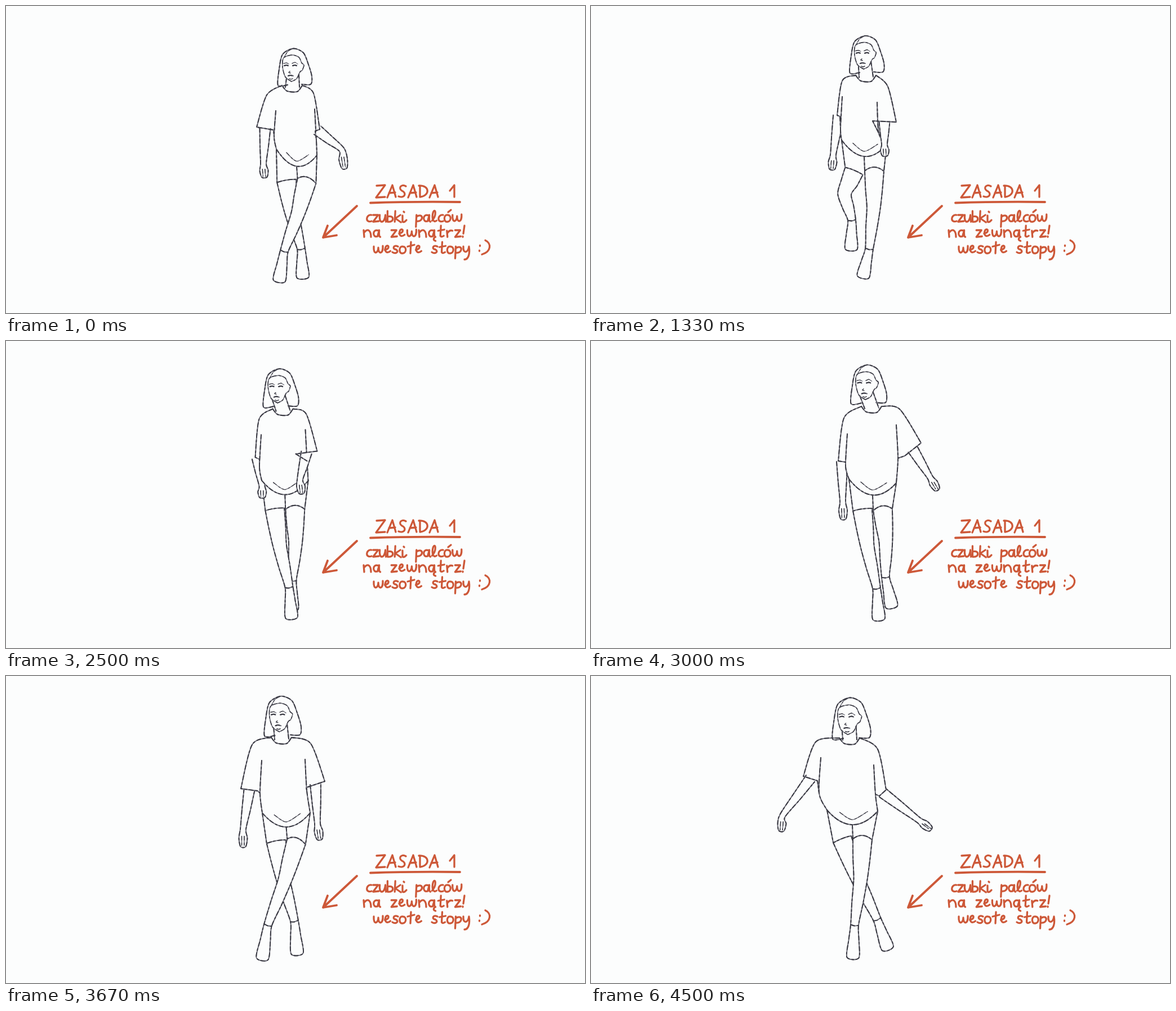
Recreate the animation shown at these times as an HTML page with a canvas. Size 1028 by 545 pixels, loop 4670 ms.

```html
<!DOCTYPE html>
<html lang="pl">
<head>
<meta charset="utf-8">
<title>Zasada 1</title>
<style>
html, body { margin: 0; width: 100%; height: 100%; overflow: hidden; background: #fcfdfd; }
canvas { display: block; width: 1028px; height: 545px; }
</style>
</head>
<body>
<canvas id="stage" width="1028" height="545" role="img"
  aria-label="ZASADA 1: czubki palców na zewnątrz! wesołe stopy :)"></canvas>
<script>
const LOOP = 4670, STEPS = 28, PAPER = '#fcfdfd', RED = '#cd5838';
const g = document.getElementById('stage').getContext('2d');
g.lineCap = g.lineJoin = 'round';

const parse = s => s.split(' ').map(p => p.split(',').map(Number));
const mix = (a, b, t = 0.5) => [a[0] + (b[0] - a[0]) * t, a[1] + (b[1] - a[1]) * t];
const move = (p, x, y) => [p[0] + x, p[1] + y];

// ---- Poses: the joints of the body at a few steps; L and R as seen on screen
const joints = ('chin neck shoulderL shoulderR outL inL outR inR waistL waistR hemL hemR ' +
  'wristL tipL wristR tipR ankleL toeL ankleR toeR').split(' ');

const poses = [
  [0, '507,134 508,147 463,158 546,155', '445,215 475,220 557,219 549,222', '476,232 551,238 480,254 552,265',
    '457,280 459,304 596,255 601,288', '524,431 527,482 494,435 485,488'],
  [4, '491,127 499,138 446,140 541,158', '424,206 445,212 550,215 538,220', '455,229 536,230 458,249 537,245',
    '408,266 407,292 611,231 627,247', '513,423 526,473 494,434 484,486'],
  [8, '484,112 488,129 446,133 527,143', '437,194 442,196 542,206 500,204', '443,218 511,226 445,238 525,246',
    '430,264 428,290 521,246 522,266', '463,380 462,432 494,431 483,481'],
  [12, '477,116 485,131 450,140 518,138', '446,200 448,205 519,210 472,197', '448,225 524,218 450,250 531,244',
    '462,230 462,240 442,250 435,277', '498,435 503,489 494,431 482,482'],
  [18, '487,104 498,122 449,137 548,121', '439,213 452,215 586,181 557,204', '452,222 545,208 458,245 542,252',
    '447,285 448,316 602,242 615,264', '507,439 511,494 523,419 534,472'],
  [22, '485,99 489,115 437,122 541,120', '417,200 447,204 566,187 533,198', '451,208 534,203 455,243 540,243',
    '421,272 421,303 553,262 557,290', '512,435 517,493 465,442 455,502'],
  [27, '456,104 459,116 399,117 509,130', '377,178 402,186 524,202 512,213', '405,208 505,210 419,238 509,240',
    '340,248 338,275 582,256 603,272', '508,432 527,484 468,442 465,500']
].map(([step, ...groups]) => ({ step, pts: parse(groups.join(' ')) }));

function poseAt(step) {
  const i = poses.findLastIndex(p => p.step <= step);
  const a = poses[i], b = poses[i + 1] || a;
  const t = (step - a.step) / (b.step - a.step || 1);
  const p = { scale: 1 + 0.12 * (step / 27) ** 2 };
  joints.forEach((name, n) => p[name] = mix(a.pts[n], b.pts[n], t));
  p.hemM = move(mix(p.hemL, p.hemR), 0, 25);
  return p;
}

// ---- Pencil
function curve(pts) {
  const path = new Path2D(), at = i => pts[Math.max(0, Math.min(pts.length - 1, i))];
  path.moveTo(...pts[0]);
  for (let i = 0; i < pts.length - 1; i++) {
    const [o, a, b, c] = [at(i - 1), at(i), at(i + 1), at(i + 2)];
    path.bezierCurveTo(a[0] + (b[0] - o[0]) / 7, a[1] + (b[1] - o[1]) / 7,
      b[0] - (c[0] - a[0]) / 7, b[1] - (c[1] - a[1]) / 7, ...b);
  }
  return path;
}

// Soft base with darker touches
function ink(path, width = 1.9) {
  g.lineWidth = width;
  g.strokeStyle = '#686873';
  g.stroke(path);
  g.setLineDash([7, 5, 3, 4]);
  g.strokeStyle = '#383841';
  g.stroke(path);
  g.setLineDash([]);
}

function solid(path) {
  g.fillStyle = PAPER;
  g.fill(path);
  ink(path);
}

const line = (pts, width) => ink(curve(pts), width);

// Both edges of a limb with the given half widths along its spine
function edges(spine, widths) {
  const side = s => spine.map((p, i) => {
    const a = spine[Math.max(0, i - 1)], b = spine[Math.min(spine.length - 1, i + 1)];
    const dx = b[0] - a[0], dy = b[1] - a[1], k = s * widths[i] / Math.hypot(dx, dy);
    return move(p, dy * k, -dx * k);
  });
  return [side(-1), side(1)];
}

// ---- Body parts
function leg(p, s) {
  const out = s === 'L' ? -1 : 1, ankle = p['ankle' + s], toe = p['toe' + s];
  const hip = move(p.hemM, 18 * out, 26);
  const bend = 3 + Math.max(0, 472 - toe[1]) * 0.3;
  const knee = move(mix(hip, ankle, 0.47), bend * out, 0);
  const spine = [hip, mix(hip, knee), knee, mix(knee, ankle), ankle, mix(ankle, toe, 0.45), toe];
  const [l, r] = edges(spine, [17, 15, 12, 10, 7, 9, 10.5]);
  const path = curve([...l, ...[...r].reverse()]), top = mix(l[0], r[0]);
  path.quadraticCurveTo(top[0], top[1] - (s === 'R' ? 14 : 3), ...l[0]);
  solid(path);
  line([l[4], move(ankle, 0, 1.5), r[4]]);
  // shorts
  line([p['hem' + s], out < 0 ? l[0] : r[0]]);
  if (s === 'R') line([p.hemM, l[0]]);
}

function arm(p, s) {
  const cuff = mix(p['out' + s], p['in' + s]), wrist = p['wrist' + s], tip = p['tip' + s];
  const spine = [cuff, mix(cuff, wrist), wrist, mix(wrist, tip), tip];
  const [l, r] = edges(spine, [9.5, 7.5, 5, 7.5, 4.5]);
  solid(curve([...l, ...r.reverse()]));
  const palm = mix(wrist, tip, 0.4);
  for (const x of [-2.5, 2]) line([move(palm, x, 0), move(mix(palm, tip, 0.9), x, 0)], 1.4);
}

function shirt(p) {
  const body = new Path2D(), ctrl = move(p.hemM, 0, 25);
  const points = [p.neck, p.shoulderL, p.waistL, p.hemL];
  points.forEach(q => body.lineTo(...q));
  body.quadraticCurveTo(...ctrl, ...p.hemR);
  [p.waistR, p.shoulderR].forEach(q => body.lineTo(...q));
  g.fillStyle = PAPER;
  g.fill(body);

  const hem = new Path2D();
  hem.moveTo(...p.hemL);
  hem.quadraticCurveTo(...ctrl, ...p.hemR);
  ink(hem);
  line([mix(p.hemL, p.hemM, 0.5), p.hemM, mix(p.hemM, p.hemR, 0.6)].map(q => move(q, 0, -9)), 1.2);
  for (const [s, inward] of [['L', 3], ['R', -3]]) {
    const waist = p['waist' + s];
    line([[waist[0] + inward, p['shoulder' + s][1] + 28], waist, p['hem' + s]]);
  }
}

function sleeve(p, s) {
  const path = curve([move(p.neck, s === 'L' ? -18 : 18, -6), p['shoulder' + s], p['out' + s]]);
  path.lineTo(...p['in' + s]);
  path.lineTo(...p['waist' + s]);
  ink(path);
}

// Measured from the chin
const hair = parse('-7,6 -24,7 -22,-22 -16,-48 3,-58.5 21,-51 30,-30 36,-9 34,5 18,5');
const face = parse('0,0 -11,-8 -16,-26 -14,-42 1,-47 13,-43 18,-33 22,-29 19,-20 15,-17 9,-5 0,0');
const marks = ['-14,-32 -9,-33 -5,-31', '1,-32 6,-34 11,-31', '-3,-18 -5,-16 -2,-15', '-4,-5 -1,-4 2,-5', '1,-58 -7,-53 -13,-43'].map(parse);
const darks = ['-13,-28 -9,-29 -6,-28', '2,-28 6,-29 9,-28', '-6,-10 -2,-11 3,-10'].map(parse);

function head(p) {
  const put = pts => pts.map(([x, y]) => move(p.chin, x * p.scale, y * p.scale));
  const [jawL, jawR] = put([[-9, -6], [13, -13]]);
  line([jawL, move(p.neck, -12, -2)]);
  line([jawR, move(p.neck, 13, -3)]);
  line([[-18, -6], [-9, 4], [9, 5], [18, -6]].map(q => move(p.neck, ...q)));
  line(put(hair));
  line(put(face), 1.5);
  for (const m of marks) line(put(m), 1.2);
  for (const d of darks) line(put(d), 2);
}

// ---- Handwriting: width, then strokes on the baseline
const glyphs = {
  Z: [16, 'M1-21L16-22L0 0L16-1'], A: [15, 'M0 0L9-22L15-1M3-8L14-9'],
  S: [14, 'M14-20C5-25 0-16 7-12C16-8 12 2 1-2'], D: [15, 'M2-21L2-1C20-3 20-22 0-21'],
  1: [12, 'M2-12L10-22L10-1'], c: [9, 'M9-12C-1-14-3 3 9-1'], z: [9, 'M0-12L9-12L0 0L10-1'],
  u: [11, 'M0-12C-2 5 9 3 10-12L11 0'], b: [10, 'M0-19L0 0C13 2 12-13 0-9'],
  k: [11, 'M1-19L0 0M10-12L1-6L11 1'], i: [7, 'M0-11L0 0Q3 2 7-3M2-18l1 1'],
  p: [10, 'M0-12L-1 9M0-9C13-17 13 1 0-1'], a: [12, 'M9-11C-2-16-3 2 7-1L10-12Q9 0 12 0'],
  l: [8, 'M0-2C9-12 6-25 2-17C-1-7 2 3 8-2'], o: [11, 'M5-12C-3-13-2 2 5 0C12-1 12-12 5-12'],
  w: [16, 'M0-12C-1 4 8 0 8-10C8 3 17 1 16-13'], n: [13, 'M0-12L1 0M1-8C8-17 13-10 13 0'],
  e: [10, 'M0-6C10-8 7-17 2-12C-2-3 4 1 10-4'], t: [11, 'M5-20L4-2Q6 1 10-2M0-11L11-13'],
  r: [10, 'M0-11L1 0M1-7Q5-13 10-11'], s: [10, 'M10-12C1-16 0-7 6-7C13-3 6 2 0-2'],
  y: [10, 'M0-12C-1 2 9-1 10-12C12 1 9 11 2 11'], '!': [3, 'M3-20L1-6M0-1l0 1'],
  ':': [3, 'M1-14l0 1M0-5l0 1'], ')': [10, 'M4-23C15-18 15-3-2 2']
};
glyphs['ó'] = [11, glyphs.o[1] + 'M6-17l5-4'];
glyphs['ą'] = [12, glyphs.a[1] + 'M11 0Q6 5 12 7'];
glyphs['ł'] = [10, 'M5-20L4 0M-1-12L11-15'];

function write(text, x, y, gap) {
  for (const ch of text) {
    if (ch === ' ') { x += 15; continue; }
    const [width, d] = glyphs[ch];
    const path = new Path2D();
    path.addPath(new Path2D(d), new DOMMatrix([1, 0, 0, 1, x, y]));
    g.stroke(path);
    x += width + gap;
  }
}

function note() {
  g.strokeStyle = RED;
  g.lineWidth = 3.3;
  write('ZASADA 1', 657, 340, 4);
  write('czubki palców', 640, 383, 2.8);
  write('na zewnątrz!', 635, 410, 4.6);
  write('wesołe stopy :)', 653, 439, 3.5);
  g.lineWidth = 3.8;
  g.stroke(new Path2D('M647 349.5Q720 347 806 348M623 355L563 411M571 390L563 411L587 407'));
}

function draw(step) {
  const p = poseAt(step);
  g.clearRect(0, 0, 1028, 545);
  // the lower foot is the nearer one
  const order = p.toeL[1] > p.toeR[1] ? ['R', 'L'] : ['L', 'R'];
  for (const s of order) leg(p, s);
  arm(p, 'L');
  shirt(p);
  arm(p, 'R');
  sleeve(p, 'L');
  sleeve(p, 'R');
  head(p);
  note();
}

const start = performance.now();
let shown = -1;

function tick() {
  const t = (performance.now() - start) % LOOP;
  let step = STEPS - 1;
  while (Math.round(step * 50 / 3) * 10 > t) step--;
  if (step !== shown) draw(shown = step);
  requestAnimationFrame(tick);
}
tick();
</script>
</body>
</html>
```
